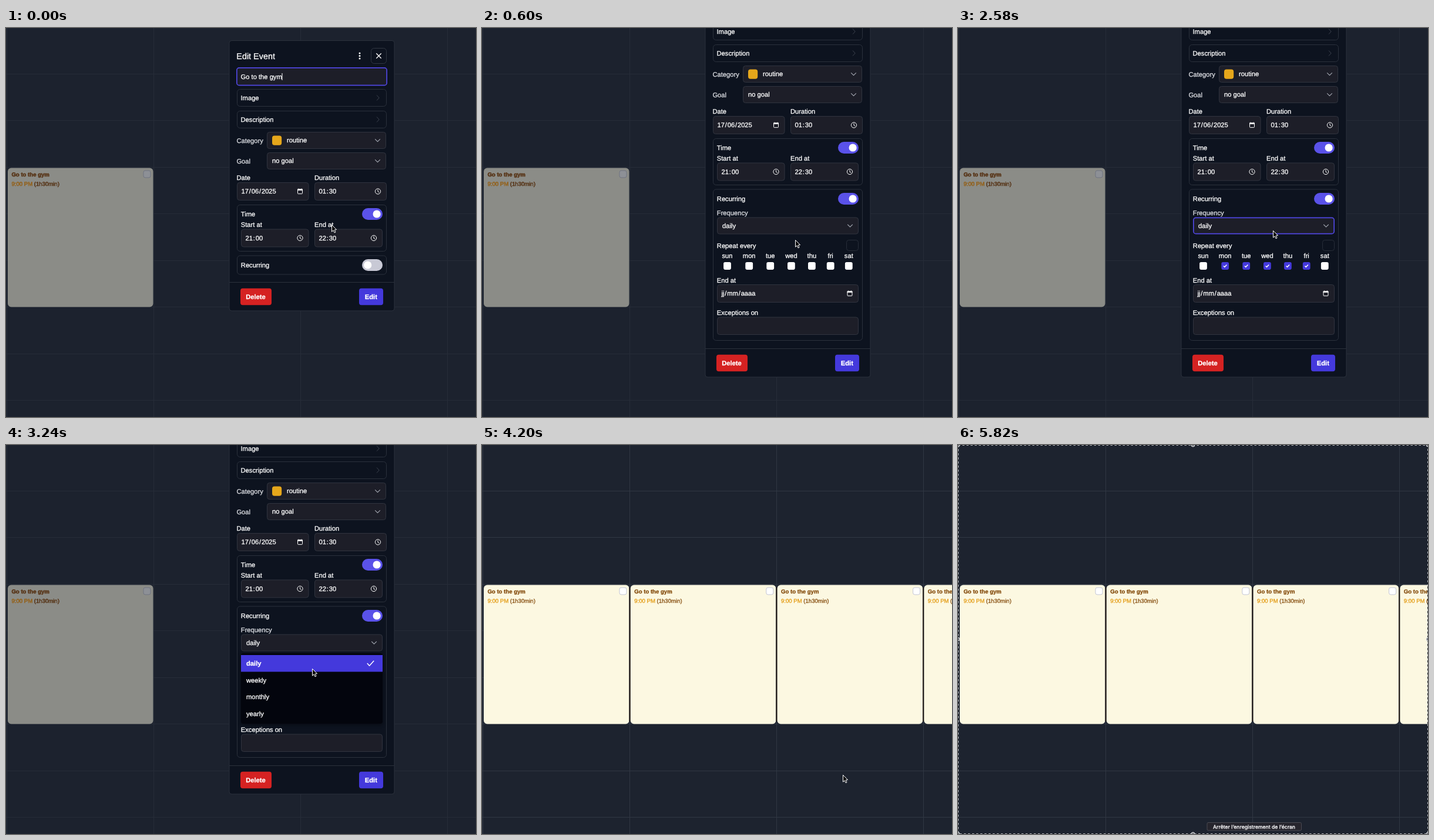
An HTML page with a canvas that plays this animation: 800 by 663 pixels, repeating every 5880 ms.

```html
<!DOCTYPE html>
<html lang="en">
<head>
<meta charset="utf-8">
<title>Recurring event</title>
<style>
  html, body { margin: 0; width: 100%; height: 100%; overflow: hidden; background: #1d232f; }
  canvas { display: block; }
</style>
</head>
<body>
<canvas id="stage" width="800" height="663"></canvas>
<script>
const ctx = document.getElementById('stage').getContext('2d');
const LOOP = 5880, STEP = 60, SHIFT = 113;
const SANS = '"Liberation Sans", Arial, sans-serif';
const BG = '#1d232f', PANEL = '#0d131f', FIELD = '#1d1e28', LINE = '#2b313c';
const INDIGO = '#4439dc', RING = '#4f46e0', WHITE = '#fff', MUTED = '#dcdee3';
const BODY = 11.2, SMALL = 9.6;

// Moments at which something is clicked or swapped
const AT = { expand: 360, focus: 2520, open: 2640, pick: 3360, close: 3960, copies: 4080, frame: 5040, tip: 5700 };
const DAYS = [
  ['sun', 417.5], ['mon', 454.7, 1020], ['tue', 490.7, 1260], ['wed', 526.4, 1500],
  ['thu', 561.4, 1800], ['fri', 593.2, 2040], ['sat', 624.3]
];
// time, x, y of the pointer tip
const PATH = [
  [0, 554, 335], [270, 621, 402], [360, 620, 402], [600, 533, 361],
  [960, 455, 404], [1040, 455, 404], [1230, 490, 404], [1290, 490, 404],
  [1470, 525, 405], [1560, 528, 405], [1740, 570, 407], [1830, 566, 406],
  [2010, 594, 406], [2160, 594, 406], [2460, 538, 346], [2580, 536, 345],
  [2820, 530, 356], [3240, 521, 381], [3420, 521, 380], [3780, 614, 562],
  [4500, 614, 562], [4740, 606, 548], [5400, 606, 548], [5700, 512, 672], [5880, 512, 680]
];

const smooth = k => k * k * (3 - 2 * k);
const clamp = k => Math.max(0, Math.min(1, k));

function box(x, y, x2, y2, r, fill, stroke, w = 1) {
  const h = stroke ? w / 2 : 0;
  ctx.beginPath();
  ctx.roundRect(x + h, y + h, x2 - x - 2 * h, y2 - y - 2 * h, r);
  if (fill) { ctx.fillStyle = fill; ctx.fill(); }
  if (stroke) { ctx.strokeStyle = stroke; ctx.lineWidth = w; ctx.stroke(); }
}

// A hairline outline gives the heavier look of smoothed screen text
function text(s, x, y, color = WHITE, size = BODY, weight = 400, align = 'left', family = SANS) {
  ctx.font = `${weight} ${size}px ${family}`;
  ctx.fillStyle = ctx.strokeStyle = color;
  ctx.lineWidth = 0.3;
  ctx.textAlign = align;
  ctx.fillText(s, x, y);
  ctx.strokeText(s, x, y);
}

function line(points, color, w = 1) {
  ctx.beginPath();
  points.forEach(([x, y]) => ctx.lineTo(x, y));
  ctx.strokeStyle = color;
  ctx.lineWidth = w;
  ctx.stroke();
}

function dot(x, y, r, fill, stroke) {
  ctx.beginPath();
  ctx.arc(x, y, r, 0, 7);
  if (fill) { ctx.fillStyle = fill; ctx.fill(); }
  if (stroke) { ctx.strokeStyle = stroke; ctx.lineWidth = 1; ctx.stroke(); }
}

// Date and time inputs pad every number group a little
function segments(s, x, y) {
  for (const part of s.split(/([/:])/)) {
    const pad = /[/:]/.test(part) ? 0 : 0.8;
    text(part, x + pad, y);
    x += ctx.measureText(part).width + 2 * pad;
  }
}

function calendarIcon(x, y) {
  box(x - 4.5, y - 4, x + 4.5, y + 4.6, 1, null, WHITE);
  ctx.fillStyle = WHITE;
  ctx.fillRect(x - 4.5, y - 4, 9, 2.4);
  ctx.fillRect(x - 3, y - 5, 1, 1);
  ctx.fillRect(x + 2, y - 5, 1, 1);
}

function clockIcon(x, y) {
  dot(x, y, 4.6, null, WHITE);
  line([[x, y - 3], [x, y + 0.3], [x + 2.3, y + 1.6]], WHITE);
}

function input(x, x2, y, value, icon) {
  box(x, y, x2, y + 31, 4, FIELD, '#30343f');
  segments(value, x + 6.8, y + 19.4);
  icon(x2 - 15, y + 15.5);
}

function select(x, x2, y, label, tx, focused) {
  box(x, y, x2, y + 29, 4, FIELD, focused ? RING : '#30343f', focused ? 1.7 : 1);
  text(label, tx, y + 18.3);
  line([[x2 - 18.8, y + 12.4], [x2 - 14.5, y + 16.6], [x2 - 10.2, y + 12.4]], '#a9adb7', 1.1);
}

function toggle(y, on) {
  box(606, y, 641, y + 20, 10, on > 0.5 ? '#5a52e9' : '#c8c9d5');
  dot(615.7 + 15.4 * on, y + 10, 6.6, WHITE);
}

function fold(y, label) {
  box(393, y, 648, y + 30, 5, null, LINE);
  text(label, 399.5, y + 19);
  line([[631, y + 10.5], [635.2, y + 15], [631, y + 19.5]], '#3c424e');
}

function check(x, y, k, w) {
  line([[x - 3 * k, y], [x - k, y + 2.2 * k], [x + 3 * k, y - 2.2 * k]], WHITE, w);
}

function checkbox(x, checked, focused) {
  const y = 405.5;
  const square = (h, r, c) => box(x - h, y - h, x + h, y + h, r, c);
  if (focused) {
    square(9.4, 4.5, RING);
    square(7.8, 3.5, WHITE);
  }
  square(6.4, 2.8, checked ? INDIGO : WHITE);
  if (checked) check(x, y, 0.9, 1.5);
}

function cardLabels(x, brown, amber) {
  text('Go to the gym', x + 6.4, 252.8, brown, SMALL, 700);
  text('9:00 PM', x + 6.4, 268.8, amber, SMALL);
  text('(1h30min)', x + 44.7, 268.8, brown, SMALL);
}

function card(x) {
  box(x, 238.5, x + 247.5, 475.5, 6, '#fcf8e1');
  cardLabels(x, '#854d0e', '#e39a10');
  box(x + 230.5, 242.5, x + 243.5, 255.5, 3, WHITE, '#c3c6d6');
}

function calendar(t) {
  ctx.fillStyle = BG;
  ctx.fillRect(0, 0, 800, 663);
  ctx.fillStyle = '#303743';
  for (let i = 0; i < 4; i++) ctx.fillRect(1 + i * 250, 0, 1, 663);
  for (let i = 0; i < 8; i++) ctx.fillRect(0, Math.round(77.6 + i * 79.5), 800, 1);
  const count = t >= AT.copies ? 4 : 1;
  for (let i = 0; i < count; i++) {
    if (i) {
      ctx.fillStyle = '#26211f';
      ctx.fillRect(i * 249.8 + 0.6, 243, 2.6, 228);
    }
    card(3 + i * 249.8);
  }
}

function upperForm() {
  text('Edit Event', 392.3, 52.5, WHITE, 14.4);
  for (const y of [43, 47.5, 52]) dot(602, y, 1.5, WHITE);
  box(621, 34, 648, 61, 5, null, '#313742');
  line([[630.3, 43.3], [638.7, 51.7]], WHITE, 1.3);
  line([[638.7, 43.3], [630.3, 51.7]], WHITE, 1.3);

  box(392, 67, 649, 98.5, 4, FIELD, RING, 1.7);
  text('Go to the gym', 399.5, 87);
  ctx.fillStyle = WHITE;
  ctx.fillRect(469.5, 77, 1, 12);

  fold(104, 'Image');
  fold(141, 'Description');
  text('Category', 392.4, 195.5, MUTED);
  select(444, 647, 177, 'routine', 478, false);
  box(453, 183.5, 469.2, 199.7, 4, '#e6a71b');
  text('Goal', 392.4, 230.5, MUTED);
  select(444, 647, 212, 'no goal', 453, false);

  text('Date', 392.4, 259);
  text('Duration', 525, 259);
  input(393, 515.5, 263, '17/06/2025', calendarIcon);
  input(525, 648, 263, '01:30', clockIcon);

  box(393, 301, 648, 381, 5, null, LINE);
  text('Time', 399.8, 321);
  toggle(307, 1);
  text('Start at', 399.8, 338.7);
  text('End at', 525, 338.7);
  input(400, 515.5, 342.5, '21:00', clockIcon);
  input(525, 641, 342.5, '22:30', clockIcon);
}

function footer() {
  ctx.fillStyle = LINE;
  ctx.fillRect(380, 433, 281, 1);
  box(399, 443.7, 452, 472.3, 4, '#d52222');
  text('Delete', 425, 462, WHITE, BODY, 700, 'center');
  box(601, 443.7, 642, 472.3, 4, INDIGO);
  text('Edit', 621.3, 462, WHITE, BODY, 700, 'center');
}

function recurrence(t) {
  const open = t >= AT.open && t < AT.pick;
  text('Frequency', 399.8, 319, MUTED);
  select(400, 641, 322.5, 'daily', 409, t >= AT.focus && !open);

  text('Repeat every', 399.8, 374.5);
  box(620, 361, 641, 380, 4, null, '#272d38');
  const done = DAYS.filter(d => t >= d[2]);
  const last = done[done.length - 1];
  for (const day of DAYS) {
    text(day[0], day[1], 392, WHITE, BODY, 400, 'center');
    checkbox(day[1], t >= day[2], day === last && t < AT.focus);
  }

  text('End at', 399.8, 433.5);
  input(400, 641, 437, 'jj/mm/aaaa', calendarIcon);
  text('Exceptions on', 399.8, 489);
  box(400, 492.5, 641, 523, 4, FIELD, '#30343f');
  if (open) menu();
}

function menu() {
  ctx.save();
  ctx.shadowColor = 'rgba(0,0,0,.4)';
  ctx.shadowBlur = 6;
  ctx.shadowOffsetY = 2;
  box(400, 355, 641, 475, 4, '#03050d');
  ctx.restore();
  ctx.fillStyle = INDIGO;
  ctx.fillRect(400, 358, 241, 28.5);
  ['daily', 'weekly', 'monthly', 'yearly'].forEach((name, i) =>
    text(name, 409, 376 + i * 28.7, WHITE, BODY, i ? 400 : 700));
  check(620.5, 372, 1.9, 1.5);
}

function modal(t) {
  ctx.fillStyle = 'rgba(29,35,47,.5)';
  ctx.fillRect(0, 0, 800, 663);
  cardLabels(3, '#5e3c20', '#996623');
  const big = t >= AT.expand, d = big ? SHIFT : 0;
  box(379.5, 21 - d, 661.5, 482.5 + d, 4, PANEL, LINE);

  ctx.save();
  ctx.translate(0, -d);
  upperForm();
  box(393, 387.5, 648, big ? 646 : 420.5, 5, null, LINE);
  text('Recurring', 399.8, 408);
  toggle(394, clamp((t - AT.expand + STEP) / 150));
  ctx.restore();

  if (big) recurrence(t);
  ctx.save();
  ctx.translate(0, d);
  footer();
  ctx.restore();
}

function pointer(t) {
  const i = PATH.findIndex(p => p[0] > t);
  const [t0, x0, y0] = PATH[i - 1], [t1, x1, y1] = PATH[i];
  const k = smooth((t - t0) / (t1 - t0));
  ctx.save();
  ctx.translate(x0 + (x1 - x0) * k, y0 + (y1 - y0) * k);
  ctx.beginPath();
  [[0.5, 0.5], [0.5, 12.2], [3.2, 9.8], [5, 13.8], [7, 13], [5.2, 9], [8.6, 8.7]]
    .forEach(([x, y]) => ctx.lineTo(x, y));
  ctx.closePath();
  ctx.fillStyle = '#0a0a0c';
  ctx.fill();
  ctx.strokeStyle = WHITE;
  ctx.lineWidth = 1;
  ctx.stroke();
  ctx.restore();
}

function captureFrame(t) {
  ctx.save();
  ctx.globalAlpha = clamp((t - AT.frame + STEP) / 180);
  ctx.strokeStyle = '#15181f';
  ctx.lineWidth = 1;
  ctx.strokeRect(0.5, 0.5, 799, 662);
  ctx.setLineDash([3.5, 3.5]);
  ctx.strokeStyle = '#b4b6ba';
  ctx.strokeRect(0.5, 0.5, 799, 662);
  ctx.setLineDash([]);
  for (const x of [0, 400, 800])
    for (const y of [0, 331, 663])
      if (x !== 400 || y !== 331) dot(x, y, 3, '#74777d', '#e2e3e6');
  ctx.restore();
}

function tooltip() {
  box(423.5, 643, 585, 657.5, 2, '#26252d', '#4b4b53');
  text('Arrêter l’enregistrement de l’écran', 504, 653.6, '#f1f1f3', 8.6, 500, 'center', 'Inter, sans-serif');
}

function draw(now) {
  const t = Math.floor((now % LOOP) / STEP) * STEP;
  calendar(t);
  if (t < AT.close) modal(t);
  if (t >= AT.frame) captureFrame(t);
  if (t >= AT.tip) tooltip();
  pointer(t);
}

ctx.lineJoin = 'round';
ctx.textRendering = 'geometricPrecision';
const start = performance.now();
function tick() {
  draw(performance.now() - start);
  requestAnimationFrame(tick);
}
tick();
</script>
</body>
</html>
```
